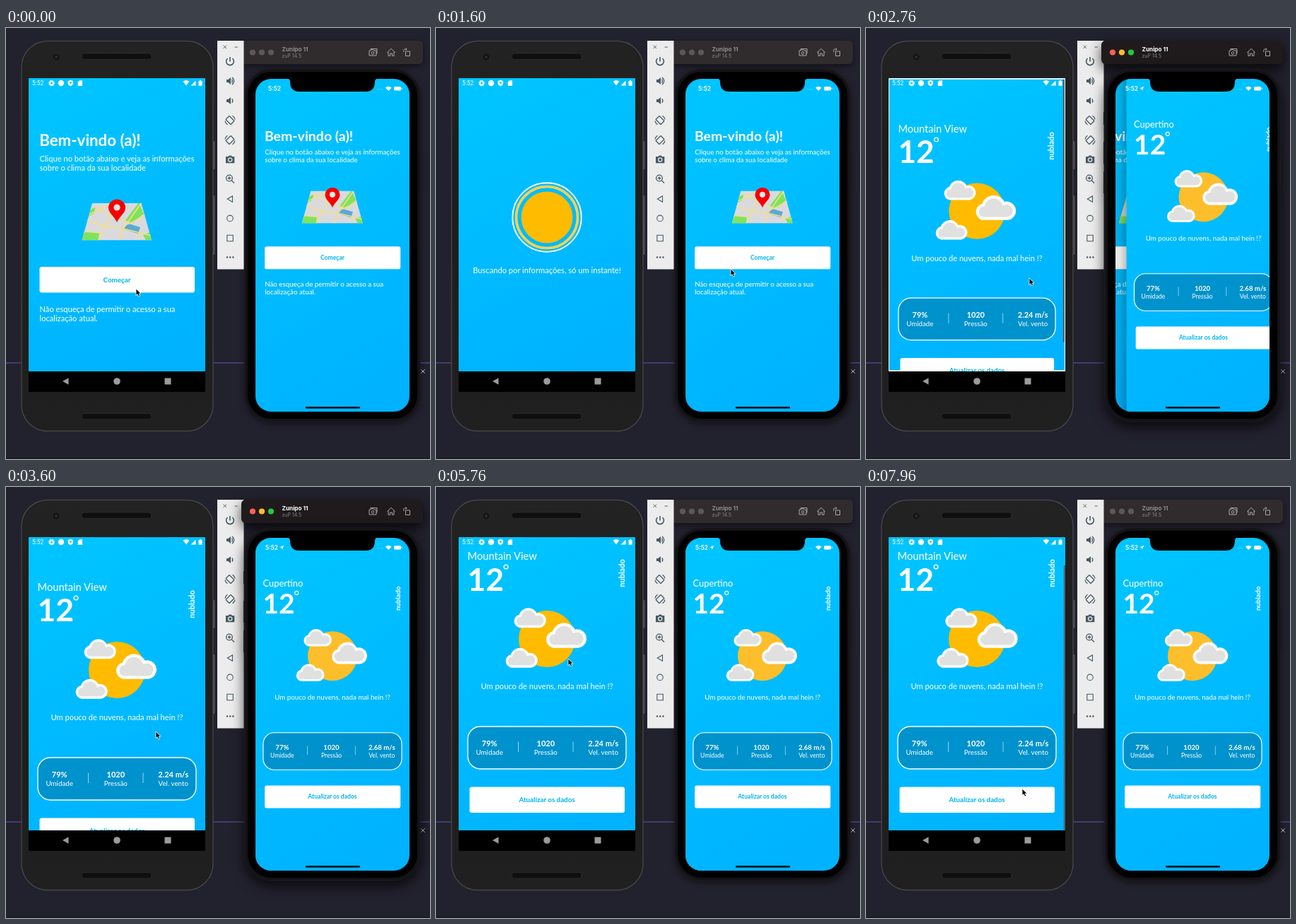
An HTML page for the animation above (8 s loop, 600 by 610 pixels).

```html
<!DOCTYPE html>
<html lang="pt-BR">
<head>
<meta charset="utf-8">
<title>Clima em dois aparelhos</title>
<style>
  html, body { margin: 0; width: 100%; height: 100%; overflow: hidden; background: #22212e; }
  svg { display: block; width: 600px; height: 610px; }
  text { font-family: Lato, sans-serif; fill: #fff; white-space: pre; }
  .ui { font-family: Inter, sans-serif; }
  .line { fill: none; stroke: #455a64; stroke-width: 1.3; }
  .tool { fill: none; stroke: #aaa6a8; stroke-width: 1; }
</style>
</head>
<body>
<svg id="stage" viewBox="0 0 600 610"></svg>
<script>
const LOOP = 8000;
const ANDROID = { x: 32, y: 71, w: 250, h: 415 };
const IOS = { x: 353, y: 72, w: 218, h: 471 };
const MAX_SCROLL = 44;

// ---------- drawing helpers ----------
const text = (x, y, size, str, attrs = '') =>
  `<text x="${x}" y="${y}" font-size="${size}" ${attrs}>${str}</text>`;
const mid = 'text-anchor="middle"';
const bold = 'font-weight="700"';
const rect = (x, y, w, h, rx, fill, attrs = '') =>
  `<rect x="${x}" y="${y}" width="${w}" height="${h}" rx="${rx}" fill="${fill}" ${attrs}/>`;
const circle = (x, y, r, fill, attrs = '') =>
  `<circle cx="${x}" cy="${y}" r="${r}" fill="${fill}" ${attrs}/>`;
const path = (d, attrs) => `<path d="${d}" ${attrs}/>`;

const button = (y, label) =>
  rect(47.5, y, 219.5, 36.5, 3, '#fff') + text(157, y + 21.6, 9.8, label, `${mid} ${bold} style="fill:#00b4f0"`);

const map = `
  <g clip-path="url(#mapClip)">
    ${rect(100, 240, 110, 62, 0, '#dadade')}
    ${path('M169 272L188 247L195 263L178 276ZM104 302L113 288L132 290L130 302ZM194 293L206 288L210 302H199ZM120 257L127 253L124 263L116 267Z', 'fill="#7fe35f"')}
    ${path('M164 284L174 277L190 282L187 291Z', 'fill="#5aa9d6"')}
    ${path('M112 271L140 281L166 284L206 294M125 253L150 265L174 277L198 265M140 281L131 302M166 284L160 302M150 265L140 281M166 284L192 247M112 288L133 290M187 291L192 302M118 264L150 248',
      'fill="none" stroke="#f6df7d" stroke-width="1.7"')}
  </g>
  ${path('M157 275C154 267 145 262 145 254.5A12 12 0 0 1 169 254.5C169 262 160 267 157 275Z', 'fill="#f40000"')}
  ${circle(157, 254, 4.6, '#f1e3e3')}`;

const welcome = text(47.2, 167, 22.3, 'Bem-vindo (a)!', bold) +
  text(47.5, 188.6, 11.15, 'Clique no botão abaixo e veja as informações') +
  text(47.5, 201.7, 11.15, 'sobre o clima da sua localidade') +
  map + button(338, 'Começar') +
  text(47.5, 402.3, 11.15, 'Não esqueça de permitir o acesso a sua') +
  text(47.5, 415.4, 11.15, 'localização atual.');

const loading = circle(157, 268, 36.5, '#ffbb00') +
  `<g class="rings" fill="none">
    <circle cx="157" cy="268" r="43.5" stroke="#ffd24d" stroke-width="3.6"/>
    <circle cx="157" cy="268" r="48.7" stroke="#fff" stroke-width="1.9"/>
  </g>` + text(157, 347, 11.15, 'Buscando por informações, só um instante!', mid);

const cloud = (x, y, scale) => path(
  'M9 25.5A7.4 7.4 0 0 1 9.3 10.9A11.3 11.3 0 0 1 30.8 9.6A8.3 8.3 0 1 1 35 25.5Z',
  `transform="translate(${x} ${y}) scale(${scale})" fill="#e0e0e0" stroke="#fff" stroke-width="3.2"`);

const stat = (x, value, label) =>
  text(x, 411, 11, value, `${mid} ${bold}`) + text(x, 423.3, 9.8, label, mid);

const weather = (city, humidity, wind, sun) => text(44.5, 146.6, 14.7, city) +
  text(44.5, 190.5, 44.5, '12', bold) +
  circle(99, 157, 2.9, 'none', 'stroke="#fff" stroke-width="1.3"') +
  text(0, 0, 11, 'nublado', `${mid} ${bold} transform="translate(266.5 166) rotate(-90)"`) +
  circle(157, 259, 40, sun) +
  `<g class="clouds">${cloud(109.7, 214.5, 1.06) + cloud(154.7, 235.5, 1.34) + cloud(97.7, 271, 1.06)}</g>` +
  text(157, 330, 11.15, 'Um pouco de nuvens, nada mal hein !?', mid) +
  rect(45, 383, 224, 60, 18, '#0092cc', 'stroke="#fff" stroke-width="1.3"') +
  stat(75.7, humidity, 'Umidade') + stat(155.3, '1020', 'Pressão') + stat(236.8, wind, 'Vel. vento') +
  path('M116.5 404.5V419M194 404.5V419', 'stroke="#8fd4f2" stroke-width="1"') +
  button(468.5, 'Atualizar os dados');

const page = (id, { x, y, w, h }, content, extra = '') =>
  `<g id="${id}">${rect(x, y, w, h, 0, 'url(#sky)')}${content}${extra}</g>`;
const fitIos = (content, dy) => `<g transform="translate(324.6 ${dy}) scale(.875)">${content}</g>`;

// ---------- devices ----------
const androidPhone = `
  ${rect(293, 160, 2.4, 40, 1, '#55535c')}${rect(293, 237, 2.4, 84, 1, '#55535c')}
  ${rect(22, 18.5, 271, 552, 37, '#202020', 'stroke="#454547" stroke-width="1.4"')}
  ${rect(24.5, 21, 266, 547, 35, 'url(#body)')}
  ${rect(107, 36, 99, 8.5, 4.2, '#0f0f0f', 'stroke="#333" stroke-width=".7"')}
  ${rect(107, 545.5, 99, 8.5, 4.2, '#0f0f0f', 'stroke="#333" stroke-width=".7"')}
  ${circle(71, 41, 4.4, '#141416')}${circle(71, 41, 2, '#2b2b33')}
  ${rect(32, 71, 250, 444, 0, '#000')}
  <g clip-path="url(#androidClip)">
    ${rect(32, 71, 250, 415, 0, '#fff')}
    ${page('aWelcome', ANDROID, welcome)}
    ${page('aLoading', ANDROID, loading)}
    ${page('aWeather', ANDROID, `<g id="aContent">${weather('Mountain View', '79%', '2.24 m/s', '#ffbb00')}</g>`,
      rect(279.8, 71, 2.2, 375, 0, '#4b6570', 'id="thumb"'))}
  </g>
  ${text(37, 81, 8.4, '5:52', 'style="font-family:Roboto,sans-serif"')}
  ${circle(64.5, 78, 2.5, 'none', 'stroke="#fff" stroke-width="2"')}
  ${circle(64.5, 78, 3.8, 'none', 'stroke="#fff" stroke-width="1.2" stroke-dasharray="1.5 1.5"')}
  ${circle(78, 78, 4.2, '#fff')}
  ${path('M91.3 73.7L95 75V78Q95 81 91.3 82.4Q87.6 81 87.6 78V75Z', 'fill="#fff"')}${circle(91.3, 77.6, 1.4, '#00bfff')}
  ${path('M104 74.3H108V82H101.7V76.6ZM250.6 75.5Q255 72.5 259.4 75.5L255 81.5ZM261.5 81.5L268.5 74.5V81.5ZM272.5 75H274V74H276V75H277.5V81.7H272.5Z', 'fill="#fff"')}
  ${path('M88.5 495.2V504.8L80 500ZM224.5 495.5H233.5V504.5H224.5Z', 'fill="#9b9b9b"')}${circle(157, 500, 4.8, '#9b9b9b')}`;

const speaker = y => path(`M312 ${y - 2}H314.5L318 ${y - 5}V${y + 5}L314.5 ${y + 2}H312Z`, 'fill="#455a64"');
const rotate = (y, flip) => `<g class="line" transform="translate(317 ${y}) scale(${flip} 1)">
  <rect x="-5" y="-3.6" width="10" height="7.2" rx=".8" transform="rotate(45)"/>
  <path d="M-7 1Q-6.5 4.5 -3.5 6.2M7 -1Q6.5 -4.5 3.5 -6.2"/></g>`;

const toolbar = `<g id="toolbar">
  ${rect(299, 18, 37.5, 323.5, 0, '#ececec')}
  ${path('M307.5 24.5L312 29M312 24.5L307.5 29M323.5 27H328', 'stroke="#666" stroke-width="1" fill="none"')}
  ${path('M317 41V47.5M313.6 43A5.4 5.4 0 1 0 320.4 43', 'class="line" style="stroke-width:1.6"')}
  ${speaker(75)}${path('M319.5 72.5Q321.5 75 319.5 77.5M320 69.8Q325.5 75 320 80.2', 'class="line"')}
  ${speaker(103)}${path('M319.8 100.3Q322 103 319.8 105.7', 'class="line"')}
  ${rotate(130.5, 1)}${rotate(158.5, -1)}
  ${path('M314.5 182L315.5 180.5H318.8L320 182H323.3V191.3H311V182Z', 'fill="#455a64"')}
  ${circle(317.2, 186.5, 2.6, '#455a64', 'stroke="#ececec" stroke-width="1.2"')}
  ${path('M319 215.5L323 219.5M313.7 212.5H318.3M316 210.2V214.8', 'class="line"')}
  ${circle(316, 212.5, 4.4, 'none', 'class="line"')}
  ${path('M320.5 237.7V246.3L313.3 242ZM312.8 293.2H321.3V301.7H312.8Z', 'class="line" style="stroke-width:1.1"')}
  ${circle(317, 269.4, 4.3, 'none', 'class="line" style="stroke-width:1.1"')}
  ${[313, 317.2, 321.4].map(x => circle(x, 324.5, 1.25, '#455a64')).join('')}
</g>`;

const simulator = `<g id="simulator">
  ${rect(333, 18, 257, 33, 6, '#302c2e', 'id="titleBar"')}
  ${[349, 362, 375].map(x => circle(x, 34.5, 4.1, '#5c585a', 'class="light"')).join('')}
  ${text(390.5, 33.3, 8.2, 'Zunipo 11', `class="ui" ${bold} id="device"`)}
  ${text(390.5, 42, 7, 'zuP 14.5', 'class="ui" style="fill:#858183"')}
  <g class="tool">
    <path d="M516 31.5V29.5H525V36H524M514 32H516L517 30.8H520L521 32H524V39H514Z"/><circle cx="519" cy="35.4" r="1.8"/>
    <path d="M539.3 34.8L545 29.3L550.7 34.8M541 33.5V39.3H543.6V36H546.4V39.3H549V33.5"/>
    <path d="M565.5 33H571.5V39.5H565.5ZM562.8 34V31.5Q562.8 30 564.3 30H567M565.5 28.5L567.2 30L565.5 31.5"/>
  </g>
  <g id="iosBody">
    ${rect(585, 172, 2.6, 55, 1, '#19191c')}
    ${path('M337 119V137M337 161V192M337 203V234', 'stroke="#19191c" stroke-width="2"')}
    ${rect(338, 58, 248, 499, 38, '#131316', 'stroke="#1d1c22"')}
  </g>
  ${rect(342, 62, 240, 491, 34, '#000')}
  <g clip-path="url(#iosClip)">
    ${page('iWelcome', IOS, fitIos(welcome, 13.6))}
    ${rect(353, 72, 218, 471, 0, '#000', 'id="dim"')}
    ${page('iLoading', IOS, fitIos(loading, 13.6))}
    ${page('iWeather', IOS, fitIos(weather('Cupertino', '77%', '2.68 m/s', '#fdbe2c'), 12.6),
      rect(343, 72, 10, 471, 0, 'url(#edge)'))}
  </g>
  ${path('M398 71.5Q402 72 402 76Q402 90 415 90H509Q522 90 522 76Q522 72 526 71.5Z', 'fill="#000"')}
  ${text(371, 88.5, 8.3, '5:52', `class="ui" font-weight="600" id="clock"`)}
  ${path('M393.3 82.7L390.8 88.7L390 86L387.3 85.2Z', 'fill="#fff" id="location"')}
  ${path('M525 86.8H533', 'stroke="#fff" stroke-opacity=".45" stroke-width="1" stroke-dasharray="1.2 1"')}
  ${path('M537 84.5Q541.3 80.8 545.6 84.5L541.3 89Z', 'fill="#fff"')}
  ${rect(549, 83, 10, 5.4, 1.5, '#fff')}${rect(559.6, 84.6, 1, 2.2, .5, '#fff')}
  ${rect(424, 536, 77, 2.6, 1.3, '#000')}
</g>`;

const stage = document.getElementById('stage');
stage.innerHTML = `
  <defs>
    <linearGradient id="sky" x1=".35" y1="0" x2=".65" y2="1"><stop stop-color="#00c4ff"/><stop offset="1" stop-color="#00b2ff"/></linearGradient>
    <linearGradient id="body" x2="0" y2="1"><stop stop-color="#232323"/><stop offset=".3" stop-color="#1d1d1d"/><stop offset="1" stop-color="#202020"/></linearGradient>
    <linearGradient id="edge"><stop stop-opacity="0"/><stop offset="1" stop-opacity=".17"/></linearGradient>
    <clipPath id="mapClip"><path d="M122 248H191.5L206 300.3H107.5Z"/></clipPath>
    <clipPath id="androidClip">${rect(32, 71, 250, 415, 0, '#000')}</clipPath>
    <clipPath id="iosClip">${rect(353, 72, 218, 471, 22, '#000')}</clipPath>
  </defs>
  ${rect(0, 0, 600, 610, 0, '#22212e')}${rect(0, 608.5, 600, 1.5, 0, '#191822')}
  ${rect(0, 473.5, 600, 1, 0, '#6d55ad')}
  ${path('M587.3 483.3L592.7 488.7M592.7 483.3L587.3 488.7', 'stroke="#c8c8cc" stroke-width="1"')}
  ${androidPhone}${toolbar}${simulator}
  ${path('M0 0V9.6L2.2 7.6L3.8 11L5.6 10.2L4.1 6.9H7Z', 'id="cursor" fill="#000" stroke="#fff" stroke-width=".8"')}`;

// ---------- motion ----------
const $ = id => document.getElementById(id);
const all = selector => [...stage.querySelectorAll(selector)];
const rings = all('.rings'), clouds = all('.clouds'), lights = all('.light');
const clamp = v => Math.min(1, Math.max(0, v));
const show = (id, on) => $(id).setAttribute('visibility', on ? 'visible' : 'hidden');
const move = (el, value) => el.setAttribute('transform', value);
const zoom = (s, x, y) => `translate(${x} ${y}) scale(${s}) translate(${-x} ${-y})`;

// Each key is [time, ...values]; values ease between neighbours and hold at the ends.
function track(keys, t) {
  const next = keys.findIndex(key => key[0] > t);
  if (next === 0) return keys[0].slice(1);
  if (next < 0) return keys[keys.length - 1].slice(1);
  const a = keys[next - 1], b = keys[next];
  const u = (t - a[0]) / (b[0] - a[0]), e = u * u * (3 - 2 * u);
  return a.slice(1).map((v, i) => v + (b[i + 1] - v) * e);
}

const cursorKeys = [[0, 184, 369], [450, 184, 369], [1600, 417, 341], [1780, 432, 328], [2050, 432, 328],
  [2760, 231, 354], [3600, 212, 346], [3950, 205, 302], [4300, 178, 258], [4680, 174, 300], [4900, 174, 304],
  [5250, 184, 258], [5760, 187, 243], [6000, 188, 246], [6350, 195, 296], [6800, 216, 466], [7450, 220, 470], [7960, 221, 427]];
const scrollKeys = [[3600, 0], [3950, MAX_SCROLL], [4300, MAX_SCROLL], [4680, 4], [4740, 0], [4900, 0],
  [5250, MAX_SCROLL], [6000, MAX_SCROLL], [6350, 0], [7450, 0], [7940, MAX_SCROLL]];
const thumbKeys = [[3000, 1], [3250, 0], [3600, 0], [3640, 1], [5400, 1], [5650, 0],
  [6000, 0], [6040, 1], [6500, 1], [6750, 0], [7450, 0], [7490, 1]];

const ANDROID_OPEN = 2555, IOS_OPEN = 2525;
let wasActive = null;

function setActive(active) {
  if (active === wasActive) return;
  wasActive = active;
  $('cursor').before(...(active ? [$('toolbar'), $('simulator')] : [$('simulator'), $('toolbar')]));
  $('titleBar').setAttribute('fill', active ? '#1f1b1c' : '#302c2e');
  $('device').style.fill = active ? '#fff' : '#8f8b8d';
  const colors = ['#ff5f57', '#febc2e', '#28c840'];
  lights.forEach((light, i) => light.setAttribute('fill', active ? colors[i] : '#5c585a'));
  const shadow = active ? 'drop-shadow(0 7px 9px #000b)' : 'drop-shadow(0 3px 4px #0007)';
  $('iosBody').style.filter = $('titleBar').style.filter = shadow;
}

function draw(t) {
  setActive(t >= 1840 && t < 3620);

  // Android: the new page grows from the centre while the old one fades.
  const p = 1 - (1 - clamp((t - ANDROID_OPEN) / 400)) ** 4;
  show('aLoading', t >= 320 && t < ANDROID_OPEN);
  show('aWeather', t >= ANDROID_OPEN);
  move($('aWeather'), zoom(.85 + .15 * p, 157, 278.5));
  $('aWeather').setAttribute('opacity', clamp(p * 1.3));
  move($('aWelcome'), zoom(1 + .1 * p, 157, 278.5));
  $('aWelcome').setAttribute('opacity', clamp(1 - p * 1.2));

  const [scroll] = track(scrollKeys, t);
  move($('aContent'), `translate(0 ${-scroll})`);
  $('thumb').setAttribute('y', 71 + scroll * 40 / MAX_SCROLL);
  $('thumb').setAttribute('opacity', track(thumbKeys, t)[0]);

  // iOS: critically damped push from the right.
  const wt = .01826 * Math.max(0, t - IOS_OPEN);
  const rest = Math.exp(-wt) * (1 + wt);
  show('iLoading', t >= 1960 && t < IOS_OPEN);
  show('iWeather', t >= IOS_OPEN);
  move($('iWeather'), `translate(${IOS.w * rest} 0)`);
  move($('iWelcome'), `translate(${-.3 * IOS.w * (1 - rest)} 0)`);
  $('dim').setAttribute('opacity', .1 * (1 - rest));
  show('location', t >= 1960);
  $('clock').setAttribute('x', t >= 1960 ? 367 : 371);

  const pulse = 1 - .025 * (1 - Math.cos(2 * Math.PI * t / 1600));
  rings.forEach(g => move(g, zoom(pulse, 157, 268)));
  const sway = 1.1 * Math.cos(2 * Math.PI * (t - 4680) / 3280);
  clouds.forEach(g => move(g, `translate(${sway} 0)`));

  move($('cursor'), `translate(${track(cursorKeys, t).join(' ')})`);
}

const start = performance.now();
function tick() {
  draw((performance.now() - start) % LOOP);
  requestAnimationFrame(tick);
}
tick();
</script>
</body>
</html>
```
